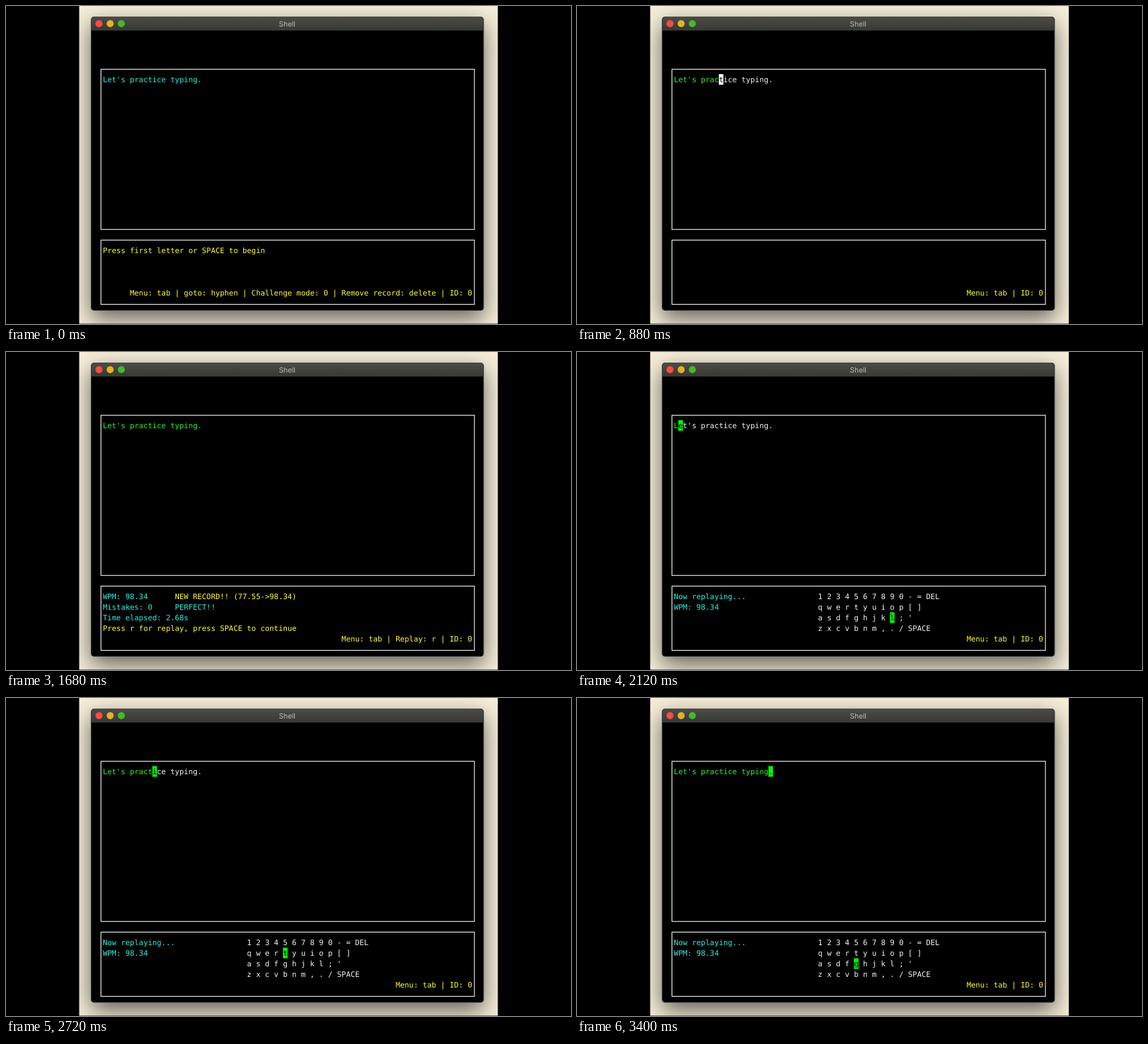
An HTML page with a canvas that plays this animation: 853x480 px, repeating every 3440 ms.

```html
<!DOCTYPE html>
<html lang="en">
<head>
<meta charset="utf-8">
<title>Typing practice</title>
<style>
html, body { margin: 0; height: 100%; overflow: hidden; background: #000; }
canvas { display: block; }
</style>
</head>
<body>
<canvas id="stage" width="853" height="480"></canvas>
<script>
const ctx = document.getElementById('stage').getContext('2d');
const LOOP = 3440, COLS = 82, CELL_W = 6.8, CELL_H = 16.12, LEFT = 146.2;
const WHITE = '#f4f4f4', CYAN = '#2eeedd', YELLOW = '#fffb36', GREEN = '#2af52a';
const PHRASE = "Let's practice typing.";
const RESULT_AT = 1660, REPLAY_AT = 2040, REPLAY_DELAY = 1750;
// [time in ms, characters typed]
const RHYTHM = [[320, 1], [465, 3], [640, 6], [870, 10], [1200, 16], [1610, 21], [1660, 22]];
const KEY_ROWS = ['1234567890-=', 'qwertyuiop[]', "asdfghjkl;'", 'zxcvbnm,./'];

function typedAt(t) {
  if (t < RHYTHM[0][0]) return 0;
  for (let i = 1; i < RHYTHM.length; i++) {
    const [t0, n0] = RHYTHM[i - 1], [t1, n1] = RHYTHM[i];
    if (t < t1) return Math.floor(n0 + (n1 - n0) * (t - t0) / (t1 - t0));
  }
  return PHRASE.length;
}

// Row 0 is the phrase; rows 16 to 20 are the lower panel.
const rowY = row => 110.8 + row * CELL_H;

function write(text, col, row, color, back) {
  const y = rowY(row);
  if (back) {
    ctx.fillStyle = back;
    ctx.fillRect(LEFT + col * CELL_W, y - 8, text.length * CELL_W, 16);
  }
  ctx.fillStyle = color;
  ctx.font = '11.3px "DejaVu Sans Mono", monospace';
  ctx.textAlign = 'center';
  [...text].forEach((c, i) => ctx.fillText(c, LEFT + (col + i + 0.5) * CELL_W, y + 4));
}

const writeRight = text => write(text, COLS - text.length, 20, YELLOW);

function roundRect(x, y, w, h, r, fill) {
  ctx.beginPath();
  ctx.roundRect(x, y, w, h, r);
  ctx.fillStyle = fill;
  ctx.fill();
}

function drawWindow() {
  ctx.fillStyle = '#000';
  ctx.fillRect(0, 0, 853, 480);
  ctx.save();
  ctx.beginPath();
  ctx.rect(110.5, 0, 632, 479.5);
  ctx.clip();
  ctx.fillStyle = '#f6eed9';
  ctx.fillRect(110, 0, 633, 480);
  ctx.shadowColor = 'rgba(0,0,0,.6)';
  ctx.shadowBlur = 34;
  ctx.shadowOffsetY = 12;
  roundRect(128, 16, 593.5, 444, 5, '#444');
  ctx.restore();

  roundRect(129, 17, 591.5, 442, 4, '#000');
  const bar = ctx.createLinearGradient(0, 17, 0, 37);
  bar.addColorStop(0, '#4b4b47');
  bar.addColorStop(1, '#383835');
  roundRect(129, 17, 591.5, 20, [4, 4, 0, 0], bar);
  ['#fb4c43', '#e1b223', '#43bb25'].forEach((color, i) => {
    ctx.beginPath();
    ctx.arc(140.4 + i * 16.85, 26.6, 5.3, 0, 7);
    ctx.fillStyle = color;
    ctx.fill();
  });
  ctx.fillStyle = '#b9b9b5';
  ctx.font = '10.8px Inter, sans-serif';
  ctx.textAlign = 'center';
  ctx.fillText('Shell', 424.5, 30.7);

  ctx.strokeStyle = '#e8e8e8';
  ctx.lineWidth = 1.2;
  ctx.strokeRect(143.4, 95.5, 563.8, 241.8);
  ctx.strokeRect(143.4, 353.4, 563.8, 97);
}

function drawPhrase(typed, cursor) {
  write(PHRASE.slice(0, typed), 0, 0, GREEN);
  if (typed < PHRASE.length) {
    write(PHRASE[typed], typed, 0, '#000', cursor);
    write(PHRASE.slice(typed + 1), typed + 1, 0, WHITE);
  }
}

function drawKeyboard(pressed) {
  const key = (label, char, col, row) => {
    const on = char === pressed;
    write(label, col, row, on ? '#000' : WHITE, on && '#0f0');
  };
  KEY_ROWS.forEach((keys, r) =>
    [...keys].forEach((c, i) => key(c, c, 32 + 2 * i, 16 + r)));
  key('DEL', 'del', 56, 16);
  key('SPACE', ' ', 52, 19);
}

function drawIntro() {
  write(PHRASE, 0, 0, CYAN);
  write('Press first letter or SPACE to begin', 0, 16, YELLOW);
  writeRight('Menu: tab | goto: hyphen | Challenge mode: 0 | Remove record: delete | ID: 0');
}

function drawResult() {
  drawPhrase(PHRASE.length);
  write('WPM: 98.34', 0, 16, CYAN);
  write('NEW RECORD!! (77.55->98.34)', 16, 16, YELLOW);
  write('Mistakes: 0', 0, 17, CYAN);
  write('PERFECT!!', 16, 17, CYAN);
  write('Time elapsed: 2.68s', 0, 18, CYAN);
  write('Press r for replay, press SPACE to continue', 0, 19, YELLOW);
  writeRight('Menu: tab | Replay: r | ID: 0');
}

function drawReplay(t) {
  const typed = typedAt(t - REPLAY_DELAY);
  drawPhrase(typed, '#0f0');
  write('Now replaying...', 0, 16, CYAN);
  write('WPM: 98.34', 0, 17, CYAN);
  drawKeyboard(typed ? PHRASE[typed - 1].toLowerCase() : '');
  writeRight('Menu: tab | ID: 0');
}

function draw(t) {
  ctx.textRendering = 'geometricPrecision';
  drawWindow();
  if (t < RHYTHM[0][0]) drawIntro();
  else if (t < RESULT_AT) {
    drawPhrase(typedAt(t), '#fff');
    writeRight('Menu: tab | ID: 0');
  } else if (t < REPLAY_AT) drawResult();
  else drawReplay(t);
}

const start = performance.now();
function tick() {
  draw((performance.now() - start) % LOOP);
  requestAnimationFrame(tick);
}
tick();
</script>
</body>
</html>
```
